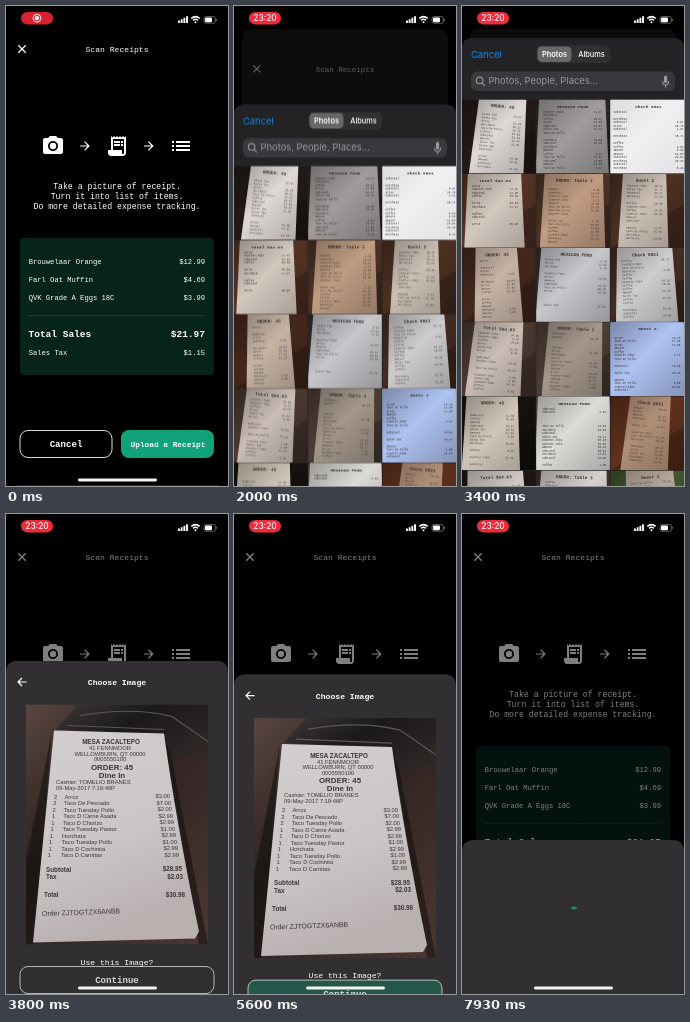
Animation, 222 px wide and 480 px high, one loop 8 s. Source, as an HTML page:

```html
<!DOCTYPE html>
<html lang="en">
<head>
<meta charset="utf-8">
<title>Receipt scanner</title>
<style>
html, body { margin: 0; width: 100%; height: 100%; overflow: hidden; background: #000; }
svg { display: block; width: 100vw; height: 100vh; }
text { fill: #fff; font: 8.1px "Liberation Mono", "DejaVu Sans Mono", monospace; white-space: pre; }
.mid { text-anchor: middle; }
.end { text-anchor: end; }
.intro { font-size: 8.2px; }
.small { font-size: 7.15px; }
.total { font-size: 9.5px; font-weight: 700; }
.action { font-size: 9.1px; font-weight: 700; }
.bold { font-weight: 700; }
.sans, .sans text { font-family: Inter, "Liberation Sans", sans-serif; }
.print text { fill: #3a3736; font: 5.8px "Liberation Sans", Arial, sans-serif; }
.print .head { font-size: 7.9px; font-weight: 700; }
.print .strong { font-size: 6.3px; font-weight: 700; }
.thumb text { fill: #3c3735; font: 2.8px "Liberation Mono", monospace; }
.thumb .title { font-size: 4.4px; font-weight: 700; }
.line { fill: none; stroke: #fff; }
.icon { fill: #fff; }
.sheet { fill: #312f32; }

/* one loop: 1% = 80 ms */
.barrier, .app, .card, .source, .picker, .choose, .loader, .press, .rec, .clock, .pill, .turn {
  animation: 8s linear infinite both;
}
.barrier { animation-name: barrier; }
.app { animation-name: app; }
.card { animation-name: card; }
.source { animation-name: source; }
.picker { animation-name: picker; }
.choose { animation-name: choose; }
.loader { animation-name: loader; }
.press { animation-name: press; }
.rec { animation-name: rec; }
.clock { animation-name: clock; }
.pill { animation-name: pill; }
.turn { animation-name: turn; }
.arc { animation: arc 1333.333ms -1136.667ms infinite both; }

@keyframes barrier { 0%, 3.75% { opacity: 0 } 6.9%, 100% { opacity: .5 } }
@keyframes source {
  0%, 3.75% { transform: translateY(154px); animation-timing-function: cubic-bezier(0,0,.2,1) }
  6.9%, 43.1% { transform: none; animation-timing-function: cubic-bezier(.8,0,1,1) }
  45.6%, 100% { transform: translateY(154px) }
}
@keyframes app {
  0%, 23.06% { transform: translate(0,0) scale(1); animation-timing-function: ease-out }
  25%, 42.75% { transform: translate(8px,23px) scale(.928); animation-timing-function: ease-out }
  46.5%, 100% { transform: translate(0,0) scale(1) }
}
@keyframes card { 0%, 23.06% { opacity: 0 } 25%, 42.75% { opacity: .36 } 46.5%, 100% { opacity: 0 } }
@keyframes picker {
  0%, 23.11% { transform: translateY(448px); animation-timing-function: cubic-bezier(.32,.72,0,1) }
  29.36%, 42.75% { transform: none; animation-timing-function: cubic-bezier(.32,.6,.2,1) }
  47%, 100% { transform: translateY(448px) }
}
@keyframes choose {
  0%, 45.5% { transform: translateY(360px); animation-timing-function: cubic-bezier(0,0,.2,1) }
  48.63%, 68.94% { transform: none; animation-timing-function: cubic-bezier(.8,0,1,1) }
  71.44%, 100% { transform: translateY(360px) }
}
@keyframes press { 0%, 66.5% { opacity: 0 } 68.5%, 100% { opacity: .35 } }
@keyframes loader {
  0%, 70.25% { transform: translateY(154px); animation-timing-function: cubic-bezier(0,0,.2,1) }
  73.38%, 100% { transform: none }
}
@keyframes turn { 0%, 69.125% { transform: rotate(-90deg) } 100% { transform: rotate(310deg) } }
@keyframes arc {
  0% { stroke-dasharray: 0 100; stroke-dashoffset: 0; transform: rotate(0); animation-timing-function: cubic-bezier(.4,0,.2,1) }
  50% { stroke-dasharray: 75 100; stroke-dashoffset: 0; transform: rotate(45deg); animation-timing-function: cubic-bezier(.4,0,.2,1) }
  100% { stroke-dasharray: 0 100; stroke-dashoffset: -75; transform: rotate(90deg) }
}
@keyframes rec { 0%, 9.25% { opacity: 1 } 10.75%, 100% { opacity: 0 } }
@keyframes clock { 0%, 9.25% { opacity: 0 } 10.4%, 100% { opacity: 1 } }
@keyframes pill { 0%, 10% { fill: #d8232f } 14%, 100% { fill: #ee2b3a } }
</style>
</head>
<body>
<svg viewBox="0 0 222 480">
  <defs>
    <path id="camera" fill-rule="evenodd" d="M12 15.2a3.2 3.2 0 1 0 0-6.4 3.2 3.2 0 0 0 0 6.4zM9 2 7.17 4H4c-1.1 0-2 .9-2 2v12c0 1.1.9 2 2 2h16c1.1 0 2-.9 2-2V6c0-1.1-.9-2-2-2h-3.17L15 2H9zm3 15c-2.76 0-5-2.24-5-5s2.24-5 5-5 5 2.24 5 5-2.24 5-5 5z"/>
    <path id="receipt" fill-rule="evenodd" d="M19.5 3.5 18 2l-1.5 1.5L15 2l-1.5 1.5L12 2l-1.5 1.5L9 2 7.5 3.5 6 2v14H3v3c0 1.66 1.34 3 3 3h12c1.66 0 3-1.34 3-3V2l-1.5 1.5zM19 19c0 .55-.45 1-1 1s-1-.45-1-1v-3H8V5h11v14zM9 7h6v2H9zM16 7h2v2h-2zM9 10h6v2H9zM16 10h2v2h-2z"/>
    <path id="list" d="M3 11h2v2H3zM3 15h2v2H3zM3 7h2v2H3zM7 11h14v2H7zM7 15h14v2H7zM7 7h14v2H7z"/>
    <path id="arrow" d="m12 4-1.41 1.41L16.17 11H4v2h12.17l-5.58 5.59L12 20l8-8z"/>
    <path id="gallery" fill-rule="evenodd" d="M22 16V4c0-1.1-.9-2-2-2H8c-1.1 0-2 .9-2 2v12c0 1.1.9 2 2 2h12c1.1 0 2-.9 2-2zm-11-4 2.03 2.71L16 11l4 5H8l3-4zM2 6v14c0 1.1.9 2 2 2h14v-2H4V6H2z"/>
    <path id="close" class="line" stroke-width="1.3" d="m-3.7-3.7 7.4 7.4m0-7.4-7.4 7.4"/>
    <path id="sheetTop" d="M0 12Q0 0 12 0H210Q222 0 222 12V480H0z"/>
    <linearGradient id="table" x2=".9" y2="1">
      <stop stop-color="#5a4640"/><stop offset=".4" stop-color="#2b201e"/><stop offset="1" stop-color="#4a3530"/>
    </linearGradient>
    <linearGradient id="tray" x2="1" y2=".6">
      <stop stop-color="#3d3939"/><stop offset=".5" stop-color="#1c191a"/><stop offset="1" stop-color="#2c2625"/>
    </linearGradient>
    <linearGradient id="paper" x2=".3" y2="1">
      <stop stop-color="#d3cfd0"/><stop offset=".6" stop-color="#cac5c6"/><stop offset="1" stop-color="#b9b0b0"/>
    </linearGradient>
    <linearGradient id="shade" x2="1" y2="1">
      <stop stop-opacity=".38"/><stop offset=".45" stop-opacity="0"/><stop offset="1" stop-opacity=".3"/>
    </linearGradient>
    <clipPath id="photoClip"><rect x="20" y="43" width="182" height="240"/></clipPath>
    <clipPath id="cellClip"><rect width="73.6" height="73.6"/></clipPath>
    <clipPath id="pickerClip"><path d="M0 42Q0 32 10 32H212Q222 32 222 42V480H0z"/></clipPath>
  </defs>
  <rect width="222" height="480"/>

  <g class="app">
    <use href="#close" x="16" y="43"/>
    <text class="mid" x="111" y="45.8">Scan Receipts</text>
    <g class="icon">
      <use href="#camera" x="35" y="128"/>
      <use href="#arrow" transform="translate(71.8 132.8) scale(.6)"/>
      <use href="#receipt" x="99" y="128"/>
      <use href="#arrow" transform="translate(135.6 132.8) scale(.6)"/>
      <use href="#list" x="163" y="128"/>
    </g>
    <text class="mid intro" x="111" y="182.6">Take a picture of receipt.</text>
    <text class="mid intro" x="111" y="193">Turn it into list of items.</text>
    <text class="mid intro" x="111" y="203.3">Do more detailed expense tracking.</text>
    <rect x="14" y="232" width="194" height="137" rx="4" fill="#06241c"/>
    <g id="bill"></g>
    <path class="line" stroke-width=".6" stroke-dasharray="1 1" opacity=".3" d="M23 309.5H199"/>
    <text class="total" x="22.5" y="330.6">Total Sales</text>
    <text class="total end" x="199" y="330.6">$21.97</text>
    <rect class="line" x="14" y="424.5" width="92" height="27" rx="8" stroke-opacity=".85"/>
    <text class="mid action" x="60" y="441.4">Cancel</text>
    <rect x="115" y="424" width="93" height="28" rx="8" fill="#12a27a"/>
    <text class="mid bold" style="font-size:7.8px" x="162" y="441">Upload a Receipt</text>

    <rect class="barrier" width="222" height="480"/>

    <g class="source">
      <use href="#sheetTop" class="sheet" y="327.5"/>
      <use href="#close" x="16" y="349"/>
      <text class="mid bold" x="111" y="351.8">Choose Source</text>
      <use href="#camera" class="icon" transform="translate(8.8 373.5) scale(.6)"/>
      <text class="action" style="font-weight:400" x="41" y="383.8">Camera</text>
      <use href="#gallery" class="icon" transform="translate(8.8 405) scale(.6)"/>
      <text class="action" style="font-weight:400" x="41" y="415.6">Gallery</text>
    </g>
    <rect class="card" width="222" height="480" rx="9" fill="#262426"/>

    <g class="choose"><g transform="translate(0 120)">
      <use href="#sheetTop" class="sheet" y="-.8"/>
      <path class="line" stroke-width="1.2" d="M20.5 20.5H12m4-4-4 4 4 4"/>
      <text class="mid bold" x="111" y="23.6">Choose Image</text>
      <g clip-path="url(#photoClip)">
        <rect x="20" y="43" width="182" height="240" fill="url(#table)"/>
        <path fill="url(#tray)" d="M72 43H202V88L166 98 160 74 50 68z"/>
        <path fill="none" stroke="#5d5655" stroke-width="1.2" d="M74 54Q126 45 166 55L202 80M62 64 158 68"/>
        <path fill="#120f0f" opacity=".55" d="M20 200 46 70 28 283H20zM158 72 166 98 202 283H193z"/>
        <path fill="url(#paper)" d="M48 69 158 72Q170 160 193 270L189 277 27 281z"/>
        <g id="ticket" class="print"></g>
      </g>
      <text class="mid" x="111" y="303">Use this Image?</text>
      <rect class="press" x="14" y="305" width="194" height="27" rx="8" fill="#12a27a"/>
      <rect class="line" x="14" y="305" width="194" height="27" rx="8" stroke-opacity=".65"/>
      <text class="mid action" opacity=".8" x="111" y="321.6">Continue</text>
    </g></g>

    <g class="loader">
      <use href="#sheetTop" class="sheet" y="326"/>
      <g transform="translate(111 403)"><g class="turn">
        <circle class="arc" r="9.2" pathLength="100" fill="none" stroke="#12a27a" stroke-width="2.3"/>
      </g></g>
    </g>
  </g>
  <rect x="72" y="472.6" width="79" height="2.8" rx="1.4" fill="#f2f2f2"/>

  <g class="picker"><g clip-path="url(#pickerClip)">
    <rect y="32" width="222" height="448" fill="#232225"/>
    <g class="sans">
      <text x="9" y="51.5" style="font-size:9.4px;fill:#1686dd">Cancel</text>
      <rect x="74.5" y="39.5" width="73.5" height="17.5" rx="5" fill="#303033"/>
      <rect x="75.5" y="40.5" width="34" height="15.5" rx="4.5" fill="#67676b"/>
      <text class="mid" x="92.5" y="51" style="font-size:7.4px;font-weight:600">Photos</text>
      <text class="mid" x="129.5" y="51" style="font-size:7.4px;font-weight:500">Albums</text>
      <rect x="9" y="65.5" width="204" height="19.5" rx="6" fill="#39383c"/>
      <g fill="none" stroke="#98989d" stroke-width="1.1">
        <circle cx="17.6" cy="74.4" r="3.3"/><path d="m20 77 2.8 2.8M200.6 75q0 4 3 4t3-4M203.6 79v2.4"/>
      </g>
      <rect x="202" y="69.5" width="3.2" height="7.6" rx="1.6" fill="#98989d"/>
      <text x="26.5" y="78.3" style="font-size:9.4px;fill:#98989d">Photos, People, Places...</text>
    </g>
    <g id="grid"></g>
  </g></g>

  <g class="sans">
    <rect class="pill" x="15" y="6" width="32" height="12.4" rx="6.2"/>
    <g class="rec"><circle class="line" cx="31" cy="12.2" r="3.9" stroke-width=".9"/><circle cx="31" cy="12.2" r="2.1" fill="#fff"/></g>
    <text class="clock mid" x="31" y="15.2" style="font-size:8.3px;font-weight:500">23:20</text>
    <path fill="#fff" d="M172 14.5h1.9V17H172zM174.7 13.2h1.9V17h-1.9zM177.4 11.8h1.9V17h-1.9zM180.1 10.2h1.9V17h-1.9z"/>
    <path class="line" stroke-width="1.5" d="M185.3 12.4q4.2-3.6 8.4 0M187.1 14.3q2.4-2 4.8 0"/>
    <circle cx="189.5" cy="16.2" r="1" fill="#fff"/>
    <rect class="line" x="198" y="10.6" width="11.4" height="6.6" rx="2" stroke-width=".7" stroke-opacity=".55"/>
    <rect x="199" y="11.6" width="7" height="4.6" rx="1.1" fill="#fff"/>
    <path fill="#999" d="M210.2 12.7q1.6 1.2 0 2.4z"/>
  </g>
</svg>
<script>
const byId = id => document.getElementById(id);
const text = (x, y, label, cls = '') => `<text x="${x}" y="${y}" class="${cls}">${label}</text>`;

byId('bill').innerHTML = [
  ['Brouwelaar Orange', '$12.99', 257.7], ['Farl Oat Muffin', '$4.69', 276],
  ['QVK Grade A Eggs 18C', '$3.99', 294.2], ['Sales Tax', '$1.15', 349.2]
].map(([name, price, y]) => text(22.7, y, name, 'small') + text(199, y, price, 'small end')).join('');

const items = [
  '2|Arroz|3.00', '2|Taco De Pescado|7.00', '2|Taco Tuesday Pollo|2.00', '1|Taco D Carne Asada|2.99',
  '1|Taco D Chorizo|2.99', '1|Taco Tuesday Pastor|1.00', '1|Horchata|2.99', '1|Taco Tuesday Pollo|1.00',
  '1|Taco D Cochinita|2.99', '1|Taco D Carnitas|2.99'
];
const sum = (y, x, right, label, price) => text(x, y, label, 'strong') + text(right, y - .5, price, 'strong end');
byId('ticket').innerHTML =
  text(105, 82.5, 'MESA ZACALTEPO', 'mid strong') +
  text(104, 88.5, '41 FENNMOOR', 'mid') + text(104, 94.2, 'WELLOWBURN, QT 00000', 'mid') +
  text(104, 99.8, '0005550100', 'mid') +
  text(106, 108.4, 'ORDER: 45', 'mid head') + text(106, 116.4, 'Dine In', 'mid head') +
  text(50, 122.3, 'Cashier: TOMELIO BRANES') + text(50, 128, '09-May-2017 7:19:46P') +
  items.map((row, i) => {
    const [count, name, price] = row.split('|'), y = 137 + i * 6.5;
    return text(48 - i * .7, y, count) + text(58.5 - i * .4, y, name) + text(164 + i, y - .3, '$' + price, 'end');
  }).join('') +
  sum(210.2, 40, 176, 'Subtotal', '$28.95') + sum(217.8, 40, 177, 'Tax', '$2.03') +
  sum(235.8, 38, 179, 'Total', '$30.98') +
  '<g transform="translate(36 254.5) rotate(-2) scale(1.2)">' + text(0, 0, 'Order ZJTOGTZX6ANBB') + '</g>';

// Table colour, paper colour, left edge, paper width, tilt
const thumbs = [
  ['#241a17', '#ded9d6', 12, 52, 5], ['#2b2624', '#a09c9b', 1, 71, 0], ['#dcdcde', '#f0f0f2', -3, 82, 0],
  ['#553325', '#d3c8be', 4, 58, 0], ['#4e3326', '#c09c82', 6, 63, 1], ['#4c3022', '#cbbfb4', 10, 48, 1],
  ['#45281d', '#c6b3a4', 13, 46, -2], ['#33302f', '#c6c6cb', 2, 74, 2], ['#442c22', '#cfccce', 6, 60, -2],
  ['#4b3930', '#c9bdb4', 8, 53, 5], ['#4d3e34', '#a3968a', 9, 58, 3], ['#7f94cf', '#aec3f2', -2, 78, 0],
  ['#15110f', '#d0c6b8', 2, 56, 1], ['#6c5a4e', '#dddbd8', 0, 76, 0], ['#5f301c', '#b08f76', 15, 45, 5],
  ['#1d1715', '#d0cac4', 5, 60, -2], ['#413029', '#d4d0cc', 2, 70, 2], ['#42552d', '#b5a797', 16, 52, -4]
];
const titles = ['ORDER: 45', 'MEXICAN FOOD', 'Check 0021', 'Total $64.63', 'ORDER: Table 3', 'Guest 2'];
const words = ['Taco De Pollo', 'Horchata', 'Sales Tax', 'Counter-Take', 'Arroz', 'Subtotal', 'Coffee', 'Amount'];
let seed = 7;
const random = () => (seed = seed * 16807 % 2147483647) / 2147483647;

byId('grid').innerHTML = thumbs.map(([table, paper, x, w, tilt], i) => {
  let print = text(x + w / 2, 8, titles[i % titles.length], 'mid title');
  for (let row = 0; row < 17; row++) {
    if (random() < .15) continue;
    const y = 13 + row * 3.5;
    print += text(x + 6, y, words[Math.floor(random() * words.length)]);
    if (random() < .75) print += text(x + w - 6, y, (random() * 40).toFixed(2), 'end');
  }
  return `<g class="thumb" transform="translate(${i % 3 * 74.2} ${93.7 + Math.floor(i / 3) * 74.2})"><g clip-path="url(#cellClip)">
    <rect width="74" height="74" fill="${table}"/><path d="M0 74 74 30V74z" opacity=".2"/>
    <g transform="rotate(${tilt} 37 37)"><path d="M${x + 2}-3H${x + w - 3}L${x + w + 1} 80H${x - 2}z" fill="${paper}"/>${print}</g>
    <rect width="74" height="74" fill="url(#shade)" opacity="${i % 3 === 2 && i < 3 ? .2 : .8}"/></g></g>`;
}).join('');
</script>
</body>
</html>
```
